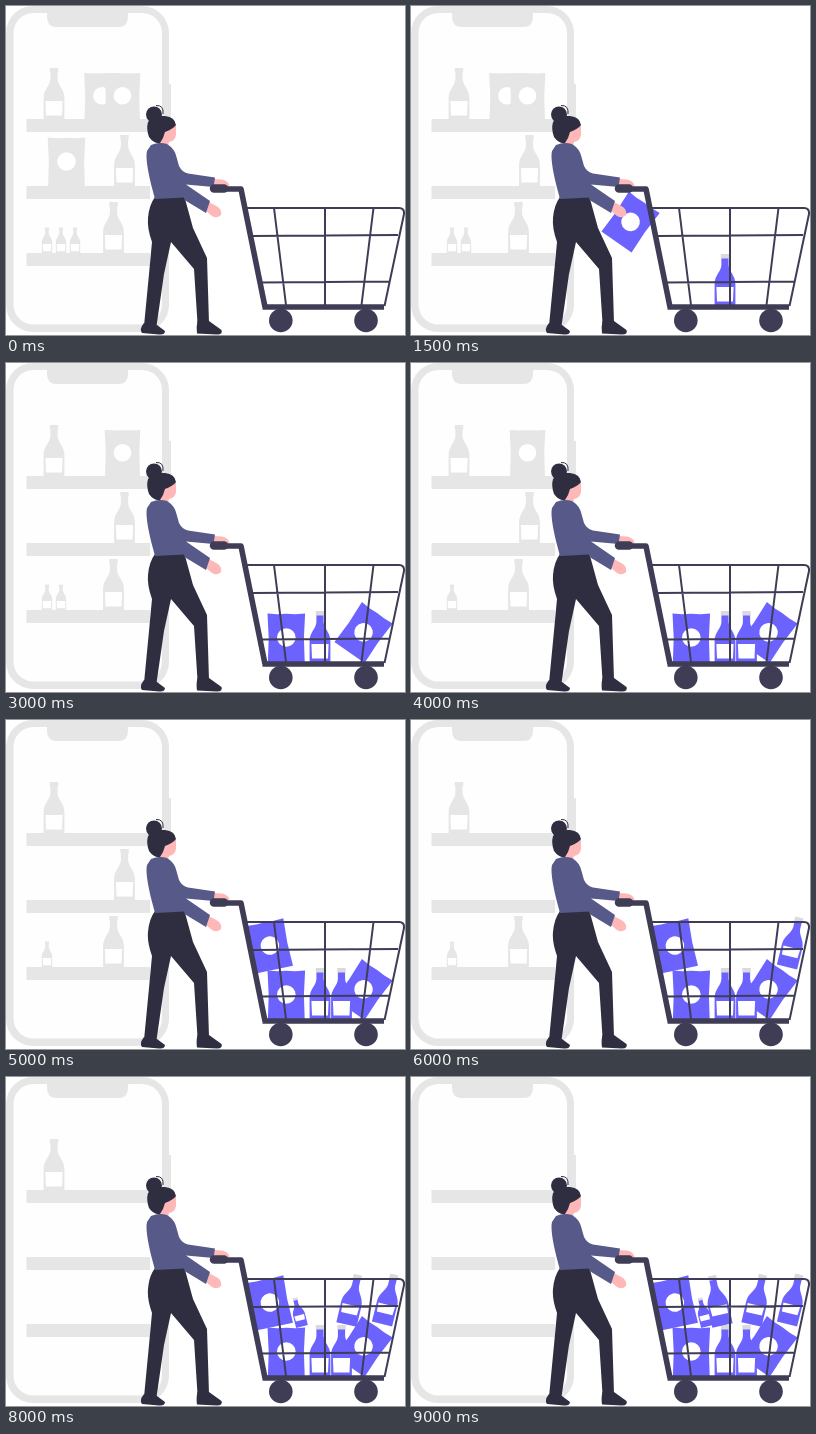
These frames come from a looping animation (399x329 px, 9500 ms). An HTML page:

```html
<!DOCTYPE html>
<html lang="en">
<head>
<meta charset="utf-8">
<title>Filling the cart</title>
<style>
  html, body { margin: 0; width: 100%; height: 100%; overflow: hidden; background: #fff; }
  svg { display: block; width: 399px; height: 329px; }
</style>
</head>
<body>
<svg viewBox="0 0 399 329">
  <defs>
    <!-- Goods stand on their bottom centre; fill is inherited -->
    <path id="glass" d="M-3.6-48H3.6V-40C4-33 10.4-30 10.4-21V0H-10.4V-21C-10.4-30-4-33-3.6-40Z"/>
    <g id="bottle">
      <use href="#glass"/>
      <path d="M-8.6-18H8.6L8-3.5H-8Z" fill="#fff"/>
    </g>
    <g id="flask">
      <use href="#glass"/>
      <path d="M-8.6-20H8.6L8-11H-8Z" fill="#fff"/>
    </g>
    <path id="cap" d="M-4.2-51H4.2V-46.5H-4.2Z"/>
    <g id="bag">
      <path d="M-18.8-48.5L-9-47.8L0-48.2L9-47.8L18.8-48.5L17.6-24L18.4 0H-18.4L-17.6-24Z"/>
      <circle cy="-24.5" r="9.3" fill="#fff"/>
    </g>
  </defs>

  <g id="phone">
    <path d="M162 78H165V117H162Z" fill="#e6e6e6"/>
    <rect width="163" height="326" rx="27" fill="#e6e6e6"/>
    <rect x="7.5" y="7" width="148.5" height="311.5" rx="20" fill="#fefefe"/>
    <path d="M41 5H122V11Q122 21 112 21H51Q41 21 41 11Z" fill="#e6e6e6"/>
    <path d="M20.5 113H144V126H20.5ZM20.5 180H144V193H20.5ZM20.5 247H144V260H20.5Z" fill="#e6e6e6"/>
  </g>
  <g id="shelved" fill="#e6e6e6"></g>
  <g id="carted" fill="#6c63ff"></g>

  <g id="legs" fill="#2f2e41">
    <path d="M149 191H178.500L187 222L201 252L203 317H191.500L188 263L165 236L158 268L150.500 320H138L143 268L146 236Q141 222 142 212Q143 199 149 191Z"/>
    <path d="M138 317L151 319L159 325Q159 329 153 328.500L136 327Q133 323 138 317ZM191.500 315H203L215.500 324Q217 328.500 211 328.500L191 327.500Q190 321 191.500 315Z"/>
  </g>
  <g id="held" fill="#6c63ff"></g>
  <g id="woman">
    <path d="M156 122L170 119L170 129Q169 135 163 136L160 141L151 140Z" fill="#ffb8b8"/>
    <path d="M207 173L216 173.500Q223 175 223.500 180L216 181L207 179ZM203 196L212 201Q216 204 215 209Q211 213 206 210L200 205Z" fill="#ffb8b8"/>
    <path d="M145 139Q153 135.500 161 138Q169 143 170.500 151L173 160Q176 166 182 167.500L209 171.500L207.500 181L180 178.500L204 195L200 207L178.500 194V191.500L149 193L145.500 180Q139 154 141 145Z" fill="#575a89"/>
    <circle cx="148" cy="108.500" r="8" fill="#2f2e41"/>
    <path d="M142 116Q147 109 159 110Q169 111 170 119Q167 123 159 126L157 132L154 137Q148 138 143 131Q140 123 142 116Z" fill="#2f2e41"/>
    <path d="M150 99.500Q158 99 157 108" fill="none" stroke="#2f2e41"/>
  </g>

  <g id="cart" fill="none" stroke="#3f3d56" stroke-width="2">
    <path d="M240 202H393Q398.500 202 398 208L378.500 300M246 230L392 229M255 276.500L383 275.500M268 202L280 299M319 202V299M367.500 202L355.500 299"/>
    <path d="M207 183H235L259 301" stroke-width="5.600" stroke-linejoin="round"/>
    <path d="M256.500 301H378" stroke-width="5.500"/>
    <path d="M208 182.500H218" stroke-width="8.500" stroke-linecap="round"/>
    <g fill="#3f3d56" stroke="none">
      <circle cx="274.800" cy="314.500" r="11.800"/>
      <circle cx="360" cy="314.500" r="11.800"/>
    </g>
  </g>
</svg>
<script>
  const STEP = 500, STEPS = 19;
  const NS = "http://www.w3.org/2000/svg";

  // Picking order; shelf and cart places are [x, y, angle] of the bottom centre.
  const goods = [
    { kind: "bottle", shelf: [69, 247], size: 0.5, cart: [314, 299, 0] },
    { kind: "bag", shelf: [60.5, 180], cart: [343.5, 289.5, 35] },
    { kind: "bag", shelf: [96, 113], size: 0.95, cart: [280.3, 299, 0] },
    { kind: "bottle", shelf: [55, 247], size: 0.5, cart: [335.5, 299, 0] },
    { kind: "bag", shelf: [116.5, 113], size: 0.95, cart: [269, 249.5, -12] },
    { kind: "bottle", shelf: [118.5, 180], cart: [376, 247, 14] },
    { kind: "bottle", shelf: [41, 247], size: 0.5, cart: [296, 249.5, -14], cartSize: 0.58 },
    { kind: "bottle", shelf: [107.5, 247], cart: [340.5, 247.5, 13] },
    { kind: "bottle", shelf: [48, 113], cart: [311.5, 248.5, -12] }
  ];
  const grip = { bag: [205.5, 236, 35], bottle: [204, 236, 30] };

  function add(parent, tag, attrs) {
    const node = document.createElementNS(NS, tag);
    for (const key in attrs) node.setAttribute(key, attrs[key]);
    return parent.appendChild(node);
  }

  // A leaning bottle shows the narrow label.
  function place(layer, kind, [x, y, angle = 0], size = 1) {
    const group = add(document.getElementById(layer), "g", {
      transform: `translate(${x} ${y}) rotate(${angle}) scale(${size})`
    });
    const isBottle = kind === "bottle";
    add(group, "use", { href: isBottle && angle ? "#flask" : "#" + kind });
    if (isBottle) {
      add(group, "use", { href: "#cap", fill: layer === "shelved" ? "#e6e6e6" : "#d9d9de" });
    }
    return group;
  }

  const views = goods.map(({ kind, shelf, size, cart, cartSize }) => [
    place("shelved", kind, shelf, size),
    place("held", kind, grip[kind], cartSize),
    place("carted", kind, cart, cartSize)
  ]);

  function draw(time) {
    const step = Math.floor(time / STEP) % STEPS;
    views.forEach((stages, i) => {
      const current = Math.max(0, Math.min(2, step - 2 * i));
      stages.forEach((node, stage) => {
        node.style.display = stage === current ? "" : "none";
      });
    });
  }

  const start = performance.now();
  function tick() {
    draw(performance.now() - start);
    requestAnimationFrame(tick);
  }
  tick();
</script>
</body>
</html>
```
